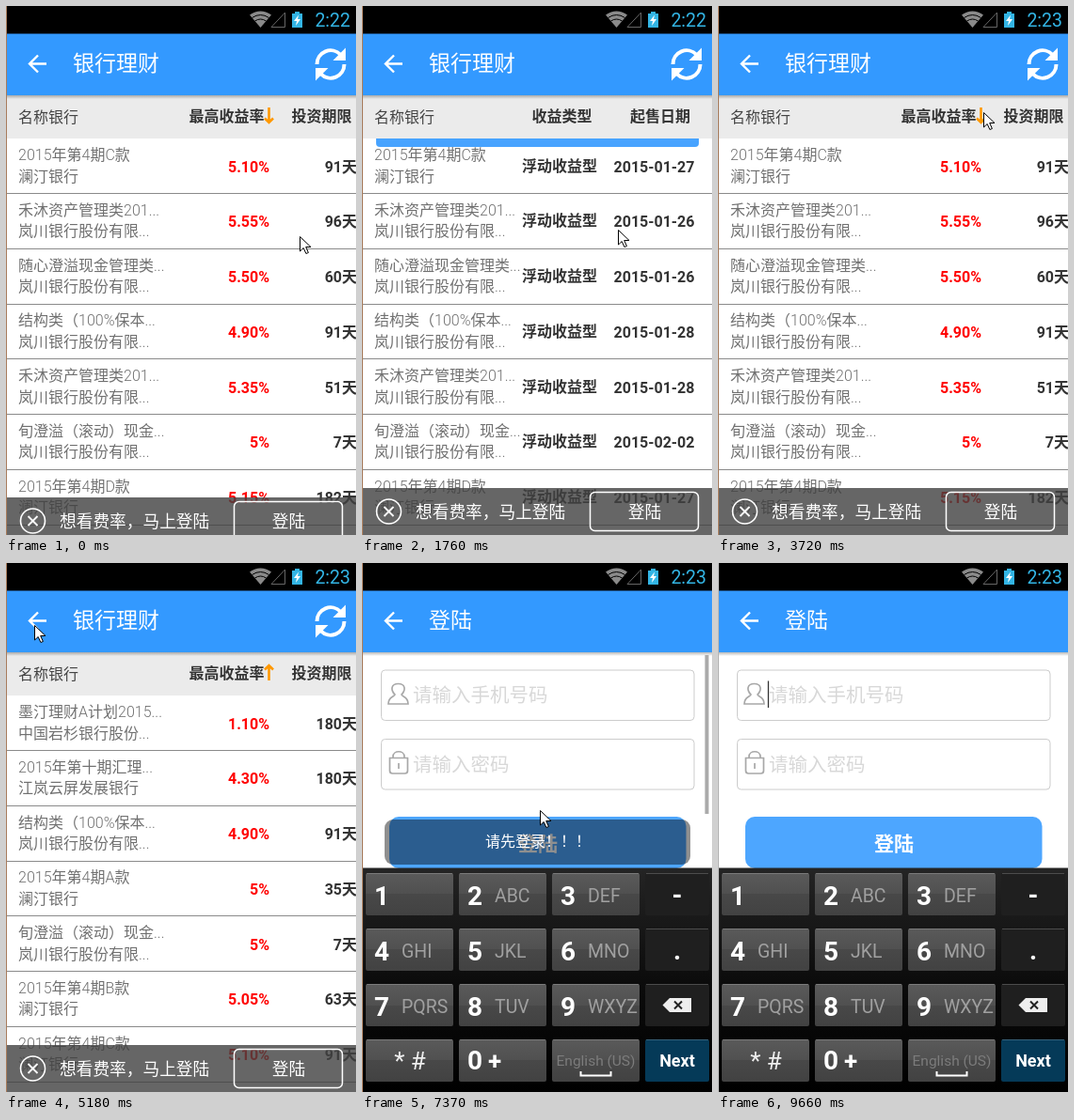
These frames come from a looping animation (372x563 px, 9.76 s). An HTML page:

```html
<!DOCTYPE html>
<html lang="zh-CN">
<head>
<meta charset="utf-8">
<title>银行理财</title>
<style>
html, body { margin: 0; width: 100%; height: 100%; overflow: hidden; background: #fff; }
svg { display: block; width: 372px; height: 563px; }
text { font: 16px Roboto, "Noto Sans CJK SC", sans-serif; white-space: pre; }
.name text { font-weight: 300; fill: #707070; }
.bold, .cell { font-weight: 700; fill: #333; }
.cell.rate { fill: #f00; }
.title { font-size: 23px; fill: #fff; }
.mid { text-anchor: middle; }
.end { text-anchor: end; }
.line { fill: none; stroke: #fff; }
.wide { font-family: Roboto, "Noto Sans CJK TC", sans-serif; fill: #fff; }
.action { font-size: 17.7px; }
.hint { font-size: 20.5px; font-weight: 300; fill: #d8d8d8; }
.link { font-size: 20.5px; font-weight: 300; }
.field { fill: #fff; stroke: #ccc; }
.icon { fill: none; stroke: #a8a8a8; stroke-width: 1.7; }
.digit { font-size: 28px; font-weight: 700; fill: #fff; }
.abc { font-size: 19.5px; fill: #a0a0a0; }
</style>
</head>
<body>
<svg viewBox="0 0 372 563">
  <defs>
    <clipPath id="cols"><rect x="168" y="95" width="204" height="468"/></clipPath>
    <clipPath id="body"><rect y="141" width="372" height="422"/></clipPath>
    <linearGradient id="shade" x2="0" y2="1">
      <stop stop-color="#000" stop-opacity=".28"/><stop offset="1" stop-color="#000" stop-opacity="0"/>
    </linearGradient>
    <linearGradient id="board" x2="0" y2="1">
      <stop stop-color="#242424"/><stop offset=".5" stop-color="#0c0c0c"/><stop offset="1" stop-color="#000"/>
    </linearGradient>
    <linearGradient id="key" x2="0" y2="1">
      <stop stop-color="#5a5a5a"/><stop offset=".5" stop-color="#505050"/><stop offset=".5" stop-color="#484848"/><stop offset="1" stop-color="#424242"/>
    </linearGradient>
    <g id="appbar">
      <rect y="29" width="372" height="66" fill="#3399ff"/>
      <rect y="95" width="372" height="4" fill="url(#shade)"/>
      <path class="line" stroke-width="2.4" d="M43 61.5H25.5M34 52.5l-9 9 9 9"/>
    </g>
  </defs>

  <rect width="372" height="563" fill="#fff"/>
  <g id="listPage">
    <g id="listA"></g>
    <g id="listB"></g>
    <rect y="95" width="372" height="46" fill="#ebebeb"/>
    <text x="13" y="124" fill="#444">名称银行</text>
    <g clip-path="url(#cols)"><g id="head" class="mid">
      <text class="bold" x="234.5" y="123">最高收益率</text>
      <path id="arrow" fill="none" stroke="#ff9800" stroke-width="2.6" d="M279.5 108V124M275 119.500l4.500 4.500 4.500-4.500"/>
      <text class="bold" x="335.5" y="123">投资期限</text>
      <text class="bold" x="428" y="123">起购金额</text>
      <text class="bold" x="532.5" y="123">收益类型</text>
      <text class="bold" x="637" y="123">起售日期</text>
    </g></g>
    <g clip-path="url(#body)"><g id="tip">
      <rect x="15" y="158" width="343" height="38" rx="4" fill="#3399ff" fill-opacity=".9"/>
      <text class="mid" x="187" y="184" fill="#fff" style="font-size:14.8px">为你推荐了10款新产品</text>
    </g></g>
    <use href="#appbar"/>
    <text class="title" x="71" y="68.7">银行理财</text>
    <g id="sync">
      <path class="line" stroke-width="4" d="M330.500 62A14.500 14.500 0 0 1 355.500 51.800"/>
      <path fill="#fff" d="M361 44.500V58H347.500z"/>
    </g>
    <use href="#sync" transform="rotate(180 345 62)"/>
    <g id="bar">
      <rect y="513" width="372" height="60" fill="#404040" fill-opacity=".8"/>
      <circle class="line" cx="28.5" cy="538" r="13" stroke-width="1.6"/>
      <path class="line" stroke-width="1.8" d="M23.500 533l10 10m0-10l-10 10"/>
      <text class="wide action" x="57" y="544.5">想看费率，马上登陆</text>
      <rect class="line" x="242.5" y="517.5" width="115" height="41" rx="5" stroke-width="1.5"/>
      <text class="wide action mid" x="300.5" y="544.5">登陆</text>
    </g>
    <rect id="dim" width="372" height="563"/>
  </g>

  <g id="login">
    <rect y="29" width="372" height="534" fill="#fff"/>
    <use href="#appbar"/>
    <text class="title" x="71" y="68.7">登陆</text>
    <rect class="field" x="20.5" y="114" width="332.5" height="53.5" rx="4"/>
    <rect class="field" x="20.5" y="187.5" width="332.5" height="53.5" rx="4"/>
    <path class="icon" d="M35 140c-5-5-4-11.500 3.500-11.500s8.500 6.500 3.500 11.500c1 3 7 2 7 10H28c0-8 6-7 7-10z"/>
    <path class="icon" d="M33 207v-1c0-7 12-7 12 0v1M29.500 207.500h19v13.500q0 3-3 3h-13q-3 0-3-3zM39 213v6"/>
    <text class="hint" x="54" y="148">请输入手机号码</text>
    <text class="hint" x="54" y="221.5">请输入密码</text>
    <path id="caret" stroke="#333" stroke-width="1.3" d="M53.500 125.500V154"/>
    <rect x="29" y="270" width="315.5" height="55" rx="10" fill="#4da6ff"/>
    <text class="mid" x="187" y="305.5" fill="#fff" style="font-size:21px;font-weight:700">登陆</text>
    <text class="link" x="29.5" y="362" fill="#3399ff">注册新号码</text>
    <text class="link end wide" x="342" y="362" style="fill:#777">忘记密码？</text>
    <rect id="thumb" x="364.5" y="98" width="4" height="169" fill="#aaa"/>
  </g>
  <g id="keys"></g>

  <g id="toast">
    <rect x="24" y="273" width="325" height="48" rx="9" fill-opacity=".44"/>
    <text class="wide mid" x="187" y="302">请先登录！！！</text>
  </g>

  <rect width="372" height="29.5"/>
  <path fill="#8a8a8a" d="M270.500 23L259 9.500Q270.500 1.500 282 9.500z"/>
  <path class="line" style="stroke:#000" d="M261.500 12.500q9-6 18 0M264.500 16q6-4 12 0"/>
  <path class="line" style="stroke:#666" d="M282 22.500H296.500V7z"/>
  <path fill="#33b5e5" d="M307 6h5v2h3v15H304V8h3z"/>
  <path fill="#fff" d="M311 9.500l-5 6.500h3l-1 5 5-7h-3z"/>
  <text id="clock" class="end" x="366" y="22" fill="#33b5e5" style="font-size:19.5px"></text>
  <rect id="edge" width="1" height="563"/>
  <path id="mouse" fill="#fff" stroke="#000" d="M.5.5V16l3.700-3.500 2.700 6 2.500-1-2.700-6H12z"/>
</svg>
<script>
const $ = id => document.getElementById(id);
const LOOP = 9760, TICK = 130, PHASE = 50;

const descending = [
  "2015年第4期C款|澜汀银行|5.10%|91天|2015-01-27",
  "禾沐资产管理类201...|岚川银行股份有限...|5.55%|96天|2015-01-26",
  "随心澄溢现金管理类...|岚川银行股份有限...|5.50%|60天|2015-01-26",
  "结构类（100%保本...|岚川银行股份有限...|4.90%|91天|2015-01-28",
  "禾沐资产管理类201...|岚川银行股份有限...|5.35%|51天|2015-01-28",
  "旬澄溢（滚动）现金...|岚川银行股份有限...|5%|7天|2015-02-02",
  "2015年第4期D款|澜汀银行|5.15%|182天|2015-01-27"
];
const ascending = [
  "墨汀理财A计划2015...|中国岩杉银行股份...|1.10%|180天",
  "2015年第十期汇理...|江岚云屏发展银行|4.30%|180天",
  "结构类（100%保本...|岚川银行股份有限...|4.90%|91天",
  "2015年第4期A款|澜汀银行|5%|35天",
  "旬澄溢（滚动）现金...|岚川银行股份有限...|5%|7天",
  "2015年第4期B款|澜汀银行|5.05%|63天",
  "2015年第4期C款|澜汀银行|5.10%|91天"
];

const label = (cls, x, y, s) => `<text class="${cls}" x="${x}" y="${y}">${s}</text>`;

function fillList(id, rows) {
  let names = "", cells = "";
  rows.forEach((row, i) => {
    const [name, bank, rate, days, date] = row.split("|");
    const y = 141 + i * 58.75, mid = y + 35.5;
    names += label("", 13, y + 23, name) + label("", 13, y + 45.5, bank) +
      `<rect y="${Math.round(y + 58)}" width="372" height="1" fill="#8a8a8a"/>`;
    cells += label("cell rate end", 280, mid, rate) + label("cell end", 373, mid, days);
    if (date) cells += label("cell end", 466, mid, "5万") +
      label("cell mid", 530, mid - 1, "浮动收益型") + label("cell mid", 630.5, mid, date);
  });
  $(id).innerHTML = `<g class="name">${names}</g><g clip-path="url(#cols)"><g class="cells">${cells}</g></g>`;
}

function buildKeys() {
  const letters = ["", "ABC", "DEF", "GHI", "JKL", "MNO", "PQRS", "TUV", "WXYZ"];
  let out = '<rect y="324.5" width="372" height="239" fill="url(#board)"/>';
  for (let r = 0; r < 4; r++) for (let c = 0; c < 4; c++) {
    const x = 4 + c * 99, y = 330 + r * 59, n = r * 3 + c, w = c < 3 ? 93 : 68;
    const fill = c < 3 ? "url(#key)" : r < 3 ? "#1f1f1f" : "#053a58";
    out += `<rect x="${x}" y="${y}" width="${w}" height="45" rx="2" fill="${fill}"/>` +
      `<rect x="${x + 1}" y="${y}" width="${w - 2}" height="1" fill="#fff" fill-opacity=".2"/>`;
    if (r < 3 && c < 3) out += label("digit", x + 9, y + 34, n + 1) + label("abc", x + 38, y + 30.5, letters[n]);
  }
  out += label("digit mid", 335, 363, "-") + label("digit mid", 335, 422, ".") +
    '<path fill="#eee" d="M319.500 470.500l7.500-7.500h23v15h-23z"/>' +
    '<path stroke="#222" stroke-width="2" d="M332 466.500l8 8m0-8l-8 8"/>' +
    '<text class="mid" x="51" y="539" fill="#eee" style="font-size:26px">* #</text>' +
    '<text x="112" y="539" class="digit">0<tspan dx="6" style="font-size:26px">+</tspan></text>' +
    '<text class="mid" x="248.5" y="535" fill="#7c7c7c" style="font-size:15.5px">English (US)</text>' +
    '<path class="line" stroke-width="2" d="M232.500 541v4.500h32V541"/>' +
    '<text class="mid" x="335" y="536" fill="#fff" style="font-size:18px;font-weight:700">Next</text>';
  $("keys").innerHTML = out;
}

fillList("listA", descending);
fillList("listB", ascending);
buildKeys();
const cells = document.querySelectorAll(".cells");

const ramp = (t, from, to) => Math.min(1, Math.max(0, (t - from) / (to - from)));
const smooth = p => p * p * (3 - 2 * p);
const easeOut = p => 1 - (1 - p) ** 2;
const move = (el, x, y) => el.setAttribute("transform", `translate(${x} ${y})`);
const fade = (el, v) => el.setAttribute("opacity", v);

// Pointer stops: arrival time, x, y. Each glide takes GLIDE ms.
const GLIDE = 400;
const stops = [[0, 312, 245], [1090, 190, 240], [1740, 272, 238], [2650, 355, 231],
  [3320, 282, 113], [5100, 30, 66], [6130, 154, 174], [6550, 181, 268], [7300, 189, 263], [8770, 300, 400]];

function pointer(t) {
  return stops.reduce(([px, py], [at, x, y]) => {
    const p = smooth(ramp(t, at - GLIDE, at));
    return [px + (x - px) * p, py + (y - py) * p];
  }, stops[0].slice(1));
}

const scroll = (t, end) => 320 * (ramp(t, 120, 1090) - ramp(t, 1890, end));

function draw(now) {
  const time = now % LOOP;
  const t = Math.floor((time - PHASE) / TICK) * TICK + PHASE;
  const sorted = t > 3700;

  // The header trails the rows on the way back.
  cells.forEach(g => move(g, -scroll(t, 2720), 0));
  move($("head"), -scroll(t, 2784), 0);
  $("listA").style.display = sorted ? "none" : "";
  $("listB").style.display = sorted ? "" : "none";
  $("arrow").setAttribute("transform", sorted ? "rotate(180 279.5 116.5)" : "");
  move($("tip"), 0, 58 * (ramp(t, 1670, 2010) - ramp(t, 2930, 3190) - 1));
  move($("bar"), 0, time < 120 ? 10 : 0);

  const p = ramp(t, 6410, 6800);
  fade($("dim"), .15 * p * (1 - p));
  fade($("login"), p);
  $("login").setAttribute("transform", `translate(186 281.5) scale(${.8 + .2 * p}) translate(-186 -281.5)`);
  fade($("caret"), t > 7400 && Math.floor((time - 6910) / 500) % 2 ? 1 : 0);
  fade($("thumb"), 1 - ramp(t, 7370, 7800));
  move($("keys"), 0, 239 * (1 - easeOut(ramp(t, 6690, 7090))));
  fade($("toast"), ramp(t, 6430, 6590) - ramp(t, 8350, 8770));

  $("clock").textContent = t < 2100 ? "2:22" : "2:23";
  $("edge").setAttribute("fill", time < 9660 ? "#a87c5c" : "#b4b4b4");
  move($("mouse"), ...pointer(t));
  fade($("mouse"), t < 8800 ? 1 : 0);
}

function frame() {
  draw(performance.now());
  requestAnimationFrame(frame);
}
frame();
</script>
</body>
</html>
```
